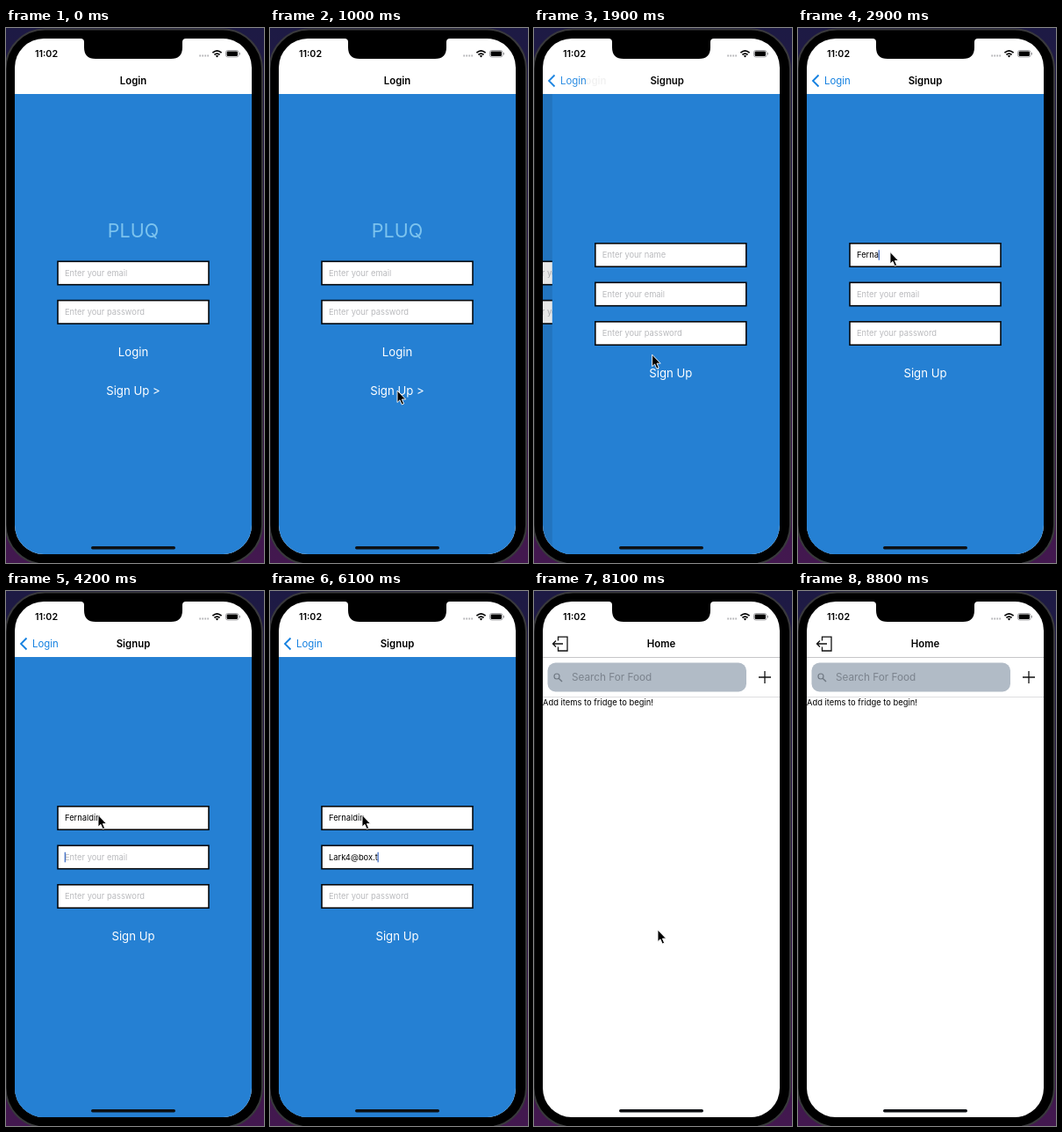
Animation of 294 by 608 pixels, one loop 9.4 s. Source, as an HTML page:

```html
<!DOCTYPE html>
<html lang="en">
<head>
<meta charset="utf-8">
<title>Sign up flow</title>
<style>
  html, body { margin: 0; width: 100%; height: 100%; overflow: hidden; background: #000; }
  svg { display: block; width: 294px; height: 608px; font-family: Inter, Roboto, sans-serif; }
  .title { font-size: 11.4px; font-weight: 600; text-anchor: middle; }
  .button { font-size: 13.2px; fill: #fff; text-anchor: middle; }
  .input { font-size: 9.33px; }
  .hint { fill: #b9babd; }
  .box { fill: #fff; stroke: #05080c; stroke-width: 1.6; }
  .line { fill: none; stroke: #111; stroke-width: 1.3; }
  .caret { fill: #3566c4; }
</style>
</head>
<body>
<svg viewBox="0 0 294 608">
  <defs>
    <linearGradient id="desk" x2="0" y2="1">
      <stop offset="0" stop-color="#1d1a44"/>
      <stop offset="1" stop-color="#43184f"/>
    </linearGradient>
    <clipPath id="glass"><rect x="10" y="12" width="270" height="586" rx="33"/></clipPath>
  </defs>

  <rect width="294" height="608" fill="url(#desk)"/>
  <rect x="-.5" y="1.5" width="292.5" height="608" rx="45" fill="#000" stroke="#39393c" stroke-width="2"/>

  <g clip-path="url(#glass)">
    <rect x="10" y="12" width="270" height="586" fill="#fff"/>

    <g id="login">
      <rect x="10" y="75" width="270" height="523" fill="#2580d3"/>
      <text x="145" y="237.5" font-size="21.5" fill="#7cc3ee" text-anchor="middle">PLUQ</text>
      <g id="loginFields"></g>
      <text class="button" x="145" y="372.5">Login</text>
      <text class="button" id="signLink" x="145" y="416.8">Sign Up &gt;</text>
      <rect id="shade" x="10" y="75" width="270" height="523"/>
    </g>

    <g id="signup">
      <rect x="10" y="75" width="270" height="523" fill="#2580d3"/>
      <g id="signupFields"></g>
      <g id="dots"></g>
      <text class="button" x="145" y="396.5">Sign Up</text>
      <rect class="caret" id="caret" width="1.2" height="11.5"/>
    </g>

    <g id="nav">
      <path id="chevron" d="M23.5 53.5L17 60l6.500 6.500" fill="none" stroke="#1480e0" stroke-width="1.8"/>
      <text id="back" x="30" y="64" font-size="11.4" fill="#1480e0">Login</text>
      <text class="title" id="titleA" y="64">Login</text>
      <text class="title" id="titleB" y="64">Signup</text>
    </g>

    <g id="home">
      <text class="title" x="145" y="64">Home</text>
      <path class="line" d="M27.500 56.500V52.200H38V68H27.500V63.500M33 60H21.500M25 56.500L21.500 60L25 63.500"/>
      <path d="M10 75.500H280" stroke="#c6c6c8"/>
      <path d="M10 120.500H280" stroke="#dedee0"/>
      <rect x="15.500" y="81.500" width="226.500" height="33" rx="9" fill="#b1bbc6"/>
      <circle cx="26" cy="97" r="3" fill="none" stroke="#6f7882" stroke-width="1.200"/>
      <path d="M28.200 99.200L32 103" stroke="#6f7882" stroke-width="1.400"/>
      <text x="43" y="102.300" font-size="11.75" fill="#7b838d">Search For Food</text>
      <path class="line" d="M256 98H270M263 91V105"/>
      <text x="10" y="130.300" font-size="9.4">Add items to fridge to begin!</text>
    </g>

    <text x="46" y="33.200" font-size="10.7" font-weight="600" text-anchor="middle">11:02</text>
    <path d="M220.300 31.500H231" stroke="#b5b5b8" stroke-width="1.800" stroke-dasharray="1.800 1.200"/>
    <g fill="none" stroke="#000" stroke-width="1.700">
      <path d="M235.400 28.200Q240.500 23.600 245.600 28.200M237.400 30.400Q240.500 27.700 243.600 30.400"/>
    </g>
    <path d="M238.700 31.600Q240.500 30.200 242.300 31.600L240.500 33.500Z"/>
    <rect x="250.500" y="25.500" width="14.500" height="7.500" rx="2.200" fill="none" stroke="#8b8b8e" stroke-width=".8"/>
    <rect x="251.600" y="26.600" width="12.300" height="5.300" rx="1.200"/>
    <path d="M266.300 28v2.500" stroke="#8b8b8e"/>
    <rect x="97" y="589" width="96" height="3.400" rx="1.700" fill="#0d1014"/>
  </g>

  <path d="M85 11V12Q89 12 89 16V22Q89 35 102 35H188Q201 35 201 22V16Q201 12 205 12V11Z"/>
  <path id="cursor" d="M0 0V13.500L3 10.800L5.200 16L7.600 15L5.400 10H9.600Z" stroke="#fff" stroke-width=".9"/>
</svg>

<script>
const LOOP = 9400, STEP = 100;
const $ = id => document.getElementById(id);
const clamp = v => Math.max(0, Math.min(1, v));
const span = (t, a, b) => clamp((t - a) / (b - a));
const smooth = u => u * u * (3 - 2 * u);
const fade = (el, v) => el.setAttribute('opacity', v);
const move = (el, x, y = 0) => el.setAttribute('transform', `translate(${x} ${y})`);

const field = (hint, y) =>
  `<rect class="box" x="59" y="${y - 13.2}" width="172" height="26.400"/>
   <text class="input hint" x="67" y="${y + 3.4}">Enter your ${hint}</text>`;

const rows = [258, 302.5, 347];
$('loginFields').innerHTML = field('email', 278.5) + field('password', 322.8);
$('signupFields').innerHTML = ['name', 'email', 'password'].map((h, i) => field(h, rows[i])).join('');
$('dots').innerHTML = [0, 1, 2].map(i => `<circle cx="${69.5 + 6.2 * i}" cy="347" r="2.300"/>`).join('');

const inputs = [...$('signupFields').querySelectorAll('text')];
const hints = inputs.map(el => el.textContent);
const dots = [...$('dots').children];

// Key press times for each field
const name = 'Fernaldin', email = 'Lark4@box.test';
const nameKeys = [...name].map((_, i) => 2500 + 100 * i);
const emailKeys = [4600, 4800, 5000, 5200, 5300, 5500, 5600, 5700, 5800, 5900, 6100, 6200, 6300, 6400];
const passKeys = [6800, 6900, 7000];
const focusTimes = [2300, 3700, 6600];
const typed = (keys, t) => keys.filter(k => k <= t).length;

// time, x, y
const path = [
  [100, 302, 470], [1000, 145, 412], [1700, 145, 412], [2300, 105, 254.5],
  [7200, 105, 254.5], [7800, 141, 385], [LOOP, 141, 385]
];

function cursorAt(t) {
  const i = Math.max(1, path.findIndex(p => p[0] > t));
  const [a, b] = [path[i - 1], path[i]];
  const u = smooth(span(t, a[0], b[0]));
  return [a[1] + (b[1] - a[1]) * u, a[2] + (b[2] - a[2]) * u];
}

function setInput(i, value) {
  inputs[i].textContent = value || hints[i];
  inputs[i].classList.toggle('hint', !value);
  return value ? inputs[i].getComputedTextLength() : 0;
}

function draw(t) {
  // Push transition
  const p = 1 - (1 - span(t, 1500, 2000)) ** 2;
  move($('login'), -81 * p);
  move($('signup'), 270 * (1 - p));
  fade($('shade'), .1 * p);
  $('titleA').setAttribute('x', 145 - 81 * p);
  $('titleB').setAttribute('x', 145 + 167 * (1 - p));
  fade($('titleA'), 1 - p ** 1.3);
  fade($('titleB'), p);
  fade($('chevron'), p);
  fade($('back'), span(p, .6, 1));
  fade($('signLink'), 1 - .8 * smooth(span(t, 1250, 1400)) * (1 - smooth(span(t, 1500, 1750))));

  // Form
  const count = typed(passKeys, t);
  const widths = [
    setInput(0, name.slice(0, typed(nameKeys, t))),
    setInput(1, email.slice(0, typed(emailKeys, t))),
    count * 6.1
  ];
  fade(inputs[2], count ? 0 : 1);
  dots.forEach((d, i) => fade(d, i < count ? 1 : 0));
  const focus = typed(focusTimes, t) - 1;
  fade($('caret'), focus < 0 ? 0 : 1);
  if (focus >= 0) move($('caret'), 66.7 + widths[focus], rows[focus] - 5.7);

  // Home
  const home = t >= 8100;
  for (const id of ['login', 'signup', 'nav']) $(id).style.display = home ? 'none' : '';
  $('home').style.display = home ? '' : 'none';

  move($('cursor'), ...cursorAt(t));
  fade($('cursor'), t < 100 ? 0 : 1 - span(t, 8500, 8800));
}

const start = performance.now();
function tick() {
  const t = (performance.now() - start) % LOOP;
  draw(Math.floor(t / STEP) * STEP);
  requestAnimationFrame(tick);
}
tick();
</script>
</body>
</html>
```
